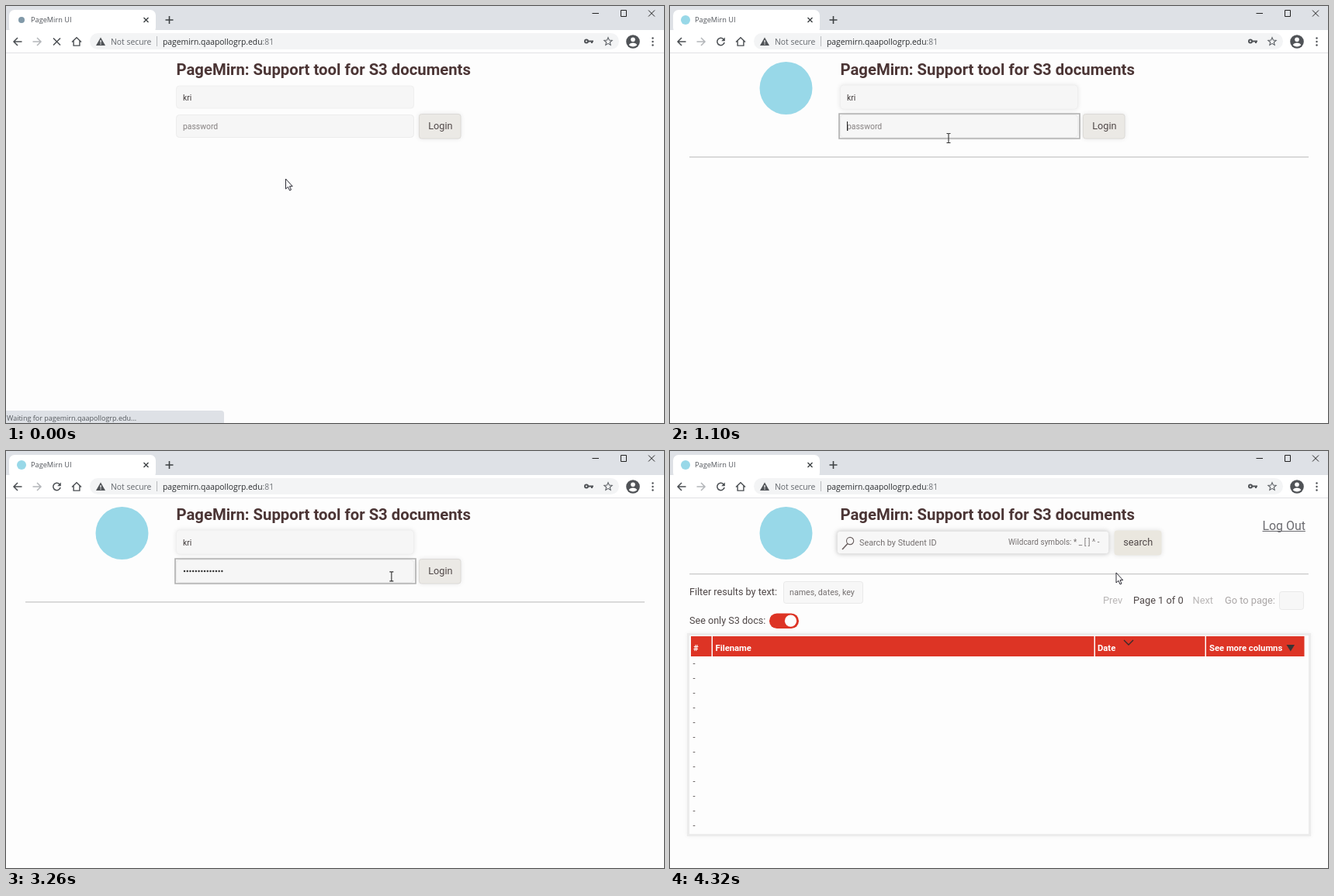
An HTML page with a canvas for the animation above (4.36 s loop, 848x538 px).

```html
<!DOCTYPE html>
<html lang="en">
<head>
<meta charset="utf-8">
<title>PageMirn UI</title>
<style>
  html, body { margin: 0; width: 100%; height: 100%; overflow: hidden; background: #fdfdfd; }
  canvas { display: block; width: 848px; height: 538px; }
</style>
</head>
<body>
<canvas id="stage" width="848" height="538"></canvas>
<script>
const ctx = document.getElementById('stage').getContext('2d');
const LOOP = 4360;
const PAGE = 'Roboto, sans-serif';
const CHROME = '"Open Sans", sans-serif';
const HOST = 'pagemirn.qaapollogrp.edu';
const RED = '#dd3425', BROWN = '#4b3535', INK = '#4f4747', BLUE = '#98d8e8';
const PRESS = 3700, LOGGED_IN = 3840, FOCUS = 1060;

// [time, number of password characters from then on]
const TYPING = [[1440, 1], [1740, 2], [1800, 3], [1840, 4], [1900, 5], [1960, 6],
  [2000, 7], [2060, 8], [2200, 9], [2300, 10], [2460, 11], [2580, 13], [2740, 14]];

const clamp = v => Math.max(0, Math.min(1, v));
const progress = (t, from, to) => clamp((t - from) / (to - from));
const lerp = (a, b, p) => a + (b - a) * p;
const smooth = p => p * p * (3 - 2 * p);

function text(str, x, y, size, color, family = PAGE, weight = 400) {
  ctx.font = `${weight} ${size}px ${family}`;
  ctx.fillStyle = color;
  ctx.fillText(str, x, y);
  return x + ctx.measureText(str).width;
}

function rect(x, y, w, h, color) {
  ctx.fillStyle = color;
  ctx.fillRect(x, y, w, h);
}

function box(x, y, w, h, r, fill, stroke, shadow) {
  ctx.save();
  ctx.beginPath();
  ctx.roundRect(x, y, w, h, r);
  if (shadow) {
    ctx.shadowColor = shadow;
    ctx.shadowBlur = 6;
  }
  ctx.fillStyle = fill;
  ctx.fill();
  ctx.shadowColor = 'transparent';
  if (stroke) {
    ctx.strokeStyle = stroke;
    ctx.lineWidth = 1;
    ctx.stroke();
  }
  ctx.restore();
}

function circle(x, y, r, fill) {
  ctx.beginPath();
  ctx.arc(x, y, r, 0, Math.PI * 2);
  ctx.fillStyle = fill;
  ctx.fill();
}

function path(d, color, width = 1.5, x = 0, y = 0, fill) {
  ctx.save();
  ctx.translate(x, y);
  const p = new Path2D(d);
  if (fill) {
    ctx.fillStyle = fill;
    ctx.fill(p);
  }
  if (color) {
    ctx.strokeStyle = color;
    ctx.lineWidth = width;
    ctx.stroke(p);
  }
  ctx.restore();
}

function star(x, y) {
  let d = '';
  for (let i = 0; i < 10; i++) {
    const a = -Math.PI / 2 + i * Math.PI / 5, r = i % 2 ? 2.4 : 5.4;
    d += `${i ? 'L' : 'M'}${r * Math.cos(a)} ${r * Math.sin(a)}`;
  }
  path(d + 'Z', '#5f6368', 1.1, x, y);
}

function drawBrowser(t) {
  const loading = t < 120;
  rect(0, 0, 848, 31, '#dee1e6');
  rect(0, 31, 848, 29, '#fff');
  rect(0, 60, 848, 1, '#e1e2e4');
  box(4, 5, 189, 30, 7, '#fff');
  if (loading) circle(20, 18, 4, '#8199a8');
  else circle(20, 18, 6, BLUE);
  text('PageMirn UI', 32, 21.3, 9.2, '#50545a', CHROME);
  path('M-3 -3L3 3M3 -3L-3 3', '#3c4043', 1.4, 180.5, 18);
  path('M-5 0H5M0 -5V5', '#3c4043', 1.6, 210.5, 18);

  path('M755.5 9.5H764', '#222', 1);
  path('M792.5 5.5h7v8h-7Z', '#222', 1);
  path('M828 5.5L836 13.5M836 5.5L828 13.5', '#222', 1);

  path('M5.5 0H-4.5M0 -5L-5 0L0 5', '#4b4f53', 1.5, 15, 46);
  path('M-5.5 0H4.5M0 -5L5 0L0 5', '#b4b7ba', 1.5, 40, 46);
  if (loading) {
    path('M-4.5 -4.5L4.5 4.5M4.5 -4.5L-4.5 4.5', '#4b4f53', 1.5, 65.5, 46);
  } else {
    path('M3.4 -3.3A4.7 4.7 0 1 0 4.6 1', '#4b4f53', 1.5, 65.5, 46);
    path('M5.3 -5.4V-.8H.7Z', null, 0, 65.5, 46, '#4b4f53');
  }
  path('M-6 .5L0 -5.3L6 .5M-3.9 -1.2V5.1H3.9V-1.2', '#4b4f53', 1.4, 91, 46);

  box(108, 35, 682, 21, 10.5, '#f3f4f5');
  path('M0 -5.5L6 5H-6Z', null, 0, 122, 46, '#505357');
  rect(121.4, 44, 1.3, 3.4, '#f3f4f5');
  rect(121.4, 48.4, 1.3, 1.3, '#f3f4f5');
  text('Not secure', 135, 49.6, 10.4, '#63676c', CHROME);
  rect(194, 39, 1, 13, '#b7babd');
  const end = text(HOST, 202, 49.6, 10.35, '#2b2d30', CHROME);
  text(':81', end, 49.6, 10.35, '#6f7377', CHROME);

  circle(748, 45.5, 3, '#505357');
  circle(748, 45.5, 1.1, '#f3f4f5');
  path('M750 45.5H757M755 45V48', '#505357', 2);
  star(776, 46);
  circle(808, 46, 8.8, '#505357');
  circle(808, 43.2, 2.8, '#fff');
  path('M-5.2 4.4C-4 .6 4 .6 5.2 4.4Q0 8.6 -5.2 4.4Z', null, 0, 808, 46, '#fff');
  for (const y of [41.5, 46, 50.5]) circle(833.5, y, 1.2, '#505357');
}

function drawStatus(t) {
  const alpha = 1 - progress(t, 200, 400);
  if (!alpha) return;
  ctx.save();
  ctx.globalAlpha = alpha;
  box(-4, 522, 285, 22, 4, '#dee1e6');
  text(`Waiting for ${HOST}...`, 1, 535, 9, '#55595e', CHROME);
  ctx.restore();
}

// The divider grows out of its middle.
function drawDivider(y, p) {
  const half = 399 * (1 - (1 - p) ** 2);
  rect(424 - half, y, half * 2, 1.5, '#cfcfcf');
}

function drawCaret(x) {
  rect(Math.floor(x), 149, 1, 12, '#222');
}

function drawPassword(t) {
  const focused = t >= FOCUS && t < PRESS + 20;
  const shade = progress(t, 20, 400);
  box(219.5, 140.5, 306, 29, 4, '#f6f6f6', '#ececec', `rgba(0,0,0,${0.11 * shade})`);
  if (focused) {
    const p = progress(t, FOCUS - 20, FOCUS + 40) * (1 - progress(t, PRESS - 20, PRESS + 20));
    path('M218 139H528V171H218Z', `rgba(176,176,176,${p})`, 1.6);
  }
  const typed = TYPING.filter(k => t >= k[0]).pop();
  const count = typed ? typed[1] : 0;
  if (!count) text('password', 228, 158.5, 10.4, '#858080');
  for (let i = 0; i < count; i++) circle(230 + 3.72 * i, 155, 1.2, '#333');
  if (focused && t < (typed ? typed[0] : FOCUS) + 500) drawCaret(228 + 3.7 * count);
}

function drawLogin(t) {
  const shade = progress(t, 20, 400);
  box(219.5, 103 - shade, 306, 29 + 2 * shade, 4, '#f6f6f6', '#efefef', `rgba(0,0,0,${0.11 * shade})`);
  text('kri', 228, 121.6, 10.4, '#403a3a');
  drawPassword(t);
  const hover = progress(t, 3360, 3440);
  if (hover < 1) box(532.5, 139.5, 53.5, 31.5, 3, '#ebe9e5', '#dcdad7', 'rgba(0,0,0,.11)');
  if (hover > 0) {
    ctx.save();
    ctx.globalAlpha = hover;
    box(531.5, 138.5, 56, 33.5, 4, '#fdfdfd', null, 'rgba(0,0,0,.06)');
    box(533.5, 140, 52, 30.5, 3, '#d5d0ca');
    ctx.restore();
  }
  text('Login', 544.2, 159.3, 12.7, hover > .5 ? '#2d2929' : INK);
  drawDivider(194.1, progress(t, 15, 500));
}

function drawTable() {
  box(22, 235, 804, 262, 0, '#ececec', null, 'rgba(0,0,0,.06)');
  rect(25, 238, 798, 256, '#fdfdfd');
  for (const [x, w] of [[27, 26.5], [55, 491.5], [548, 141.5], [691, 126.5]]) rect(x, 239, w, 26, RED);
  for (const [label, x] of [['#', 30], ['Filename', 58.5], ['Date', 551], ['See more columns', 695]])
    text(label, x, 258, 11.25, '#fff', PAGE, 700);
  path('M585 244L591 250L597 244', '#3a2b2b', 1.4);
  path('M794.5 250H805L799.8 258.5Z', null, 0, 0, 0, '#3b3434');
  for (let i = 0; i < 12; i++) text('-', 29.5, 278 + 19 * i, 11, INK);
}

function drawPager() {
  const size = 12.8, y = 196.5;
  text('Prev', 558, y, size, '#b9b6b6');
  text('Page 1 of 0', 597, y, size, INK);
  text('Next', 673.5, y, size, '#b9b6b6');
  text('Go to page:', 715, y, size, '#aaa6a6');
  box(785.5, 181.5, 31, 23, 3, '#f7f7f7', '#e9e9e9');
}

function drawResults(t) {
  box(215.5, 103.5, 350, 29, 3, '#f7f7f7', '#e4e4e4', 'rgba(0,0,0,.26)');
  path('M229.2 119.2L222 127', '#6b6060', 1.6);
  path('M227.5 116a4.6 4.6 0 1 0 9.2 0a4.6 4.6 0 1 0 -9.2 0', '#6b6060', 1.1);
  text('Search by Student ID', 244, 121.6, 10.8, '#757070');
  text('Wildcard symbols: * _ [ ] ^ -', 436, 121.2, 10, '#757070');
  box(572.5, 102.5, 61, 32, 4, '#eae7df', null, 'rgba(0,0,0,.12)');
  text('search', 584.2, 122.3, 12.7, INK);
  const end = text('Log Out', 763.5, 101.5, 15.9, '#6b6b70');
  rect(763.5, 103, end - 763.5, 1, '#6b6b70');
  drawDivider(157.9, progress(t, LOGGED_IN - 20, 4330));

  text('Filter results by text:', 25, 186.4, 12.64, INK);
  box(146.5, 168.5, 102, 28, 3, '#f7f7f7', '#e9e9e9');
  text('names, dates, key', 154, 186.4, 10.65, '#757070');
  drawPager();
  text('See only S3 docs:', 25, 223.3, 12.6, INK);
  box(128, 209.5, 38, 19.5, 9.75, RED);
  circle(155.5, 219.2, 7.6, '#fdfdfd');
  drawTable();
}

function drawCursor(t) {
  const down = smooth(progress(t, 780, 920));
  const across = smooth(progress(t, 3000, 3440));
  const x = lerp(lerp(360.5, 359, down), 575, across);
  const y = lerp(lerp(223, 170.5, down), 157, across);
  const overField = y > 139 && y < 171 && x < 528;
  const overButton = x > 532 && t < LOGGED_IN;
  if (overField) {
    path('M-2.5 -6H-.8L0 -5.4L.8 -6H2.5M0 -5.5V5.5M-2.5 6H-.8L0 5.4L.8 6H2.5', '#333', 1.1, x, y);
  } else if (overButton) {
    path('M-1.5 1Q0 -1.2 1.4 1V6Q3 4.8 4 6.2Q5.8 5.4 6.6 7Q8.7 6.6 9 8.6V12.5L7.2 15.5V18H0V16L-3.8 11.5Q-5 9 -3 9L-1.5 10.5Z',
      '#222', 1, x, y, '#fff');
    path('M1.4 6V9.5M4 6.5V9.7M6.6 7V10', '#222', .8, x, y);
  } else {
    path('M0 0V13L3 10.3L5 15L7 14.1L5 9.6H8.7Z', '#2c2c35', 1, x, y, '#fff');
  }
}

function draw(t) {
  rect(0, 0, 848, 538, '#fdfdfd');
  drawBrowser(t);
  if (t >= 60) circle(149.5, 106, 34, BLUE);
  text('PageMirn: Support tool for S3 documents', 219.5, 89.3, 20.3, BROWN, PAGE, 700);
  if (t < LOGGED_IN) drawLogin(t);
  else drawResults(t);
  drawStatus(t);
  drawCursor(t);
}

const start = performance.now();
function tick() {
  draw((performance.now() - start) % LOOP);
  requestAnimationFrame(tick);
}
tick();
</script>
</body>
</html>
```
